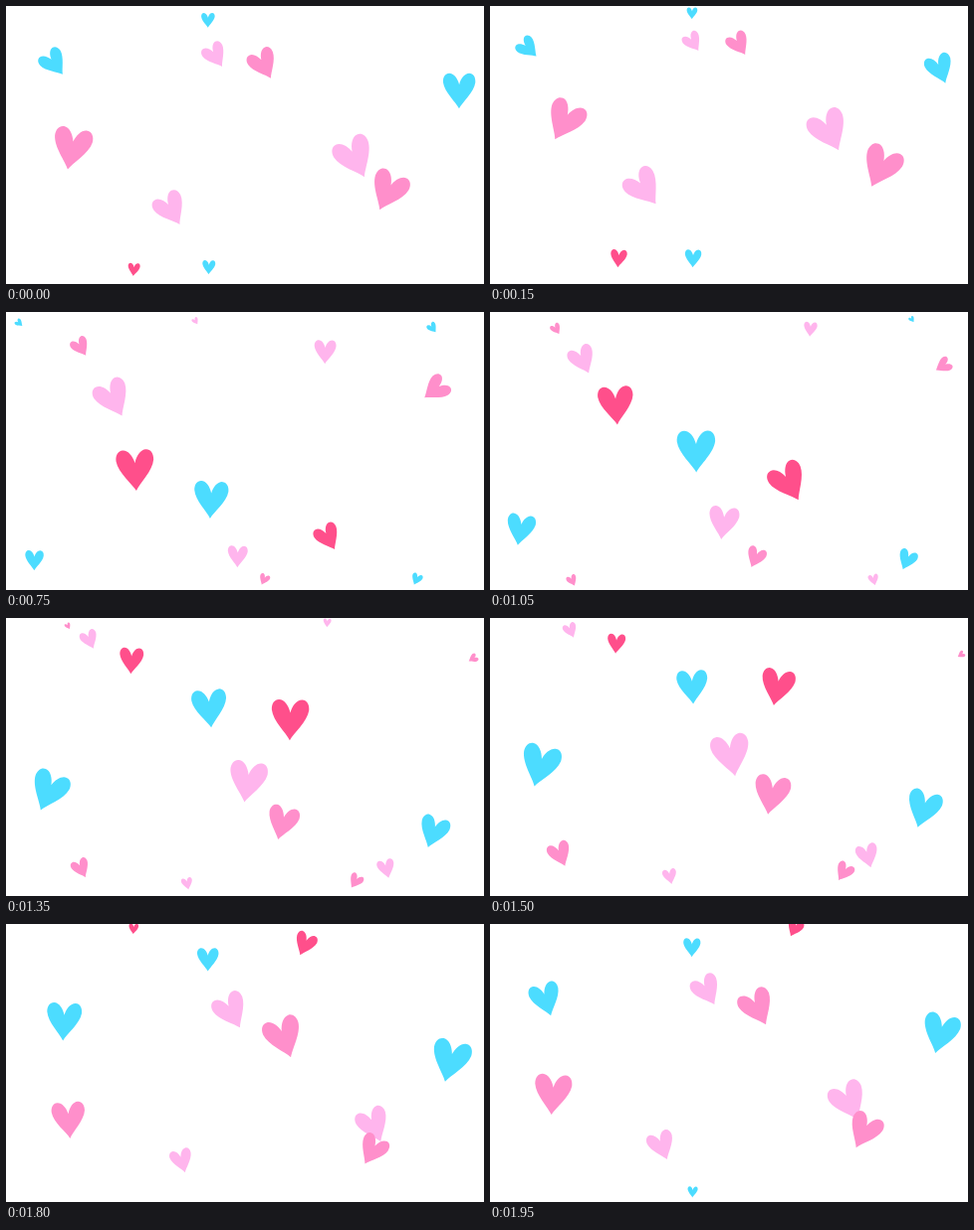
These frames come from a looping animation (480 px wide and 280 px high, 2.1 s). An HTML page:

```html
<!DOCTYPE html>
<html lang="en">
<head>
<meta charset="utf-8">
<title>Floating hearts</title>
<style>
  html, body { margin: 0; width: 100%; height: 100%; overflow: hidden; background: #fff; }
  svg { display: block; width: 100vw; height: 100vh; }
</style>
</head>
<body>
<svg id="stage" viewBox="0 0 480 280"></svg>
<script>
const STEP = 150, STEPS = 14, FLOOR = 288;
const CYAN = '#4cdcff', PINK = '#ff8fcb', PALE = '#ffb5ed', RED = '#ff4f8b';
const HEART = 'M0 53C-10 34-46 4-50-26C-51-42-43-53-31-53C-17-53-5-38 0-19' +
  'C5-38 17-53 31-53C43-53 51-42 50-26C46 4 10 34 0 53Z';
const stage = document.getElementById('stage');
const hearts = [];

// Smooth curve through evenly spaced values, p from 0 to 1.
function spline(values, p) {
  const last = values.length - 1, x = p * last;
  const i = Math.min(Math.floor(x), last - 1), t = x - i;
  const b = values[i], c = values[i + 1];
  const a = values[i - 1] ?? 2 * b - c, d = values[i + 2] ?? 2 * c - b;
  return b + t / 2 * (c - a + t * (2 * a - 5 * b + 4 * c - d + t * (3 * (b - c) + d - a)));
}

// middle: step of fastest rise; pace: duration in steps; top: height it rises
// towards; xs: sideways course from the floor to the top.
// A flight may outlast the loop, so up to three copies of it can be visible.
function heart(color, middle, pace, top, ...xs) {
  for (let lap = 0; lap < 3; lap++) {
    const node = document.createElementNS('http://www.w3.org/2000/svg', 'path');
    node.setAttribute('d', HEART);
    node.setAttribute('fill', color);
    stage.appendChild(node);
    hearts.push({ node, middle: middle - lap * STEPS, pace, top, xs });
  }
}

heart(CYAN, 10.2, 5.5, 0, 28, 31, 51, 55, 5);
heart(PINK, 14, 5.1, 0, 89, 65, 66, 86, 59);
heart(PALE, 16.95, 6.05, -14, 186, 169, 129, 98, 72);
heart(RED, 19.65, 4.5, -12, 127, 131, 129, 125.5, 129);
heart(CYAN, 21.1, 5.9, -12, 203, 205, 207, 203, 203);
heart(PALE, 9.8, 5.4, 0, 232, 234, 243, 220, 186);
heart(PINK, 11.25, 4.6, -10, 253, 276, 284, 261, 227);
heart(RED, 8.25, 4.5, -30, 350, 316, 287, 292, 318);
heart(PALE, 14.5, 5.5, -8, 389, 373, 346, 322, 323);
heart(PINK, 15.2, 5.3, 28, 340, 370, 394, 419, 482);
heart(CYAN, 11.8, 5.1, 0, 406, 429, 445, 454, 420);

// Hearts ease in and out of the rise, grow with its speed and lean into their course.
function place({ node, middle, pace, top, xs }, step) {
  const u = (step - middle) / pace;
  const eased = Math.tanh(u), p = (1 + eased) / 2;
  const y = FLOOR + (top - FLOOR) * p;
  const visible = u > -1.47 && u < 1.85 && y > 1.5;
  node.style.display = visible ? '' : 'none';
  if (!visible) return;

  const x = spline(xs, p);
  const course = (spline(xs, p + 0.01) - spline(xs, p - 0.01)) / (0.02 * (FLOOR - top));
  const tilt = 1.25 * Math.atan(course) * 180 / Math.PI;
  const scale = (2 + 40 * (1 - eased * eased)) / 106;
  node.setAttribute('transform',
    `translate(${x} ${y}) rotate(${tilt}) scale(${scale * 0.97} ${scale})`);
}

const start = performance.now();
function tick() {
  const step = Math.floor((performance.now() - start) / STEP) % STEPS;
  for (const item of hearts) place(item, step);
  requestAnimationFrame(tick);
}
tick();
</script>
</body>
</html>
```
